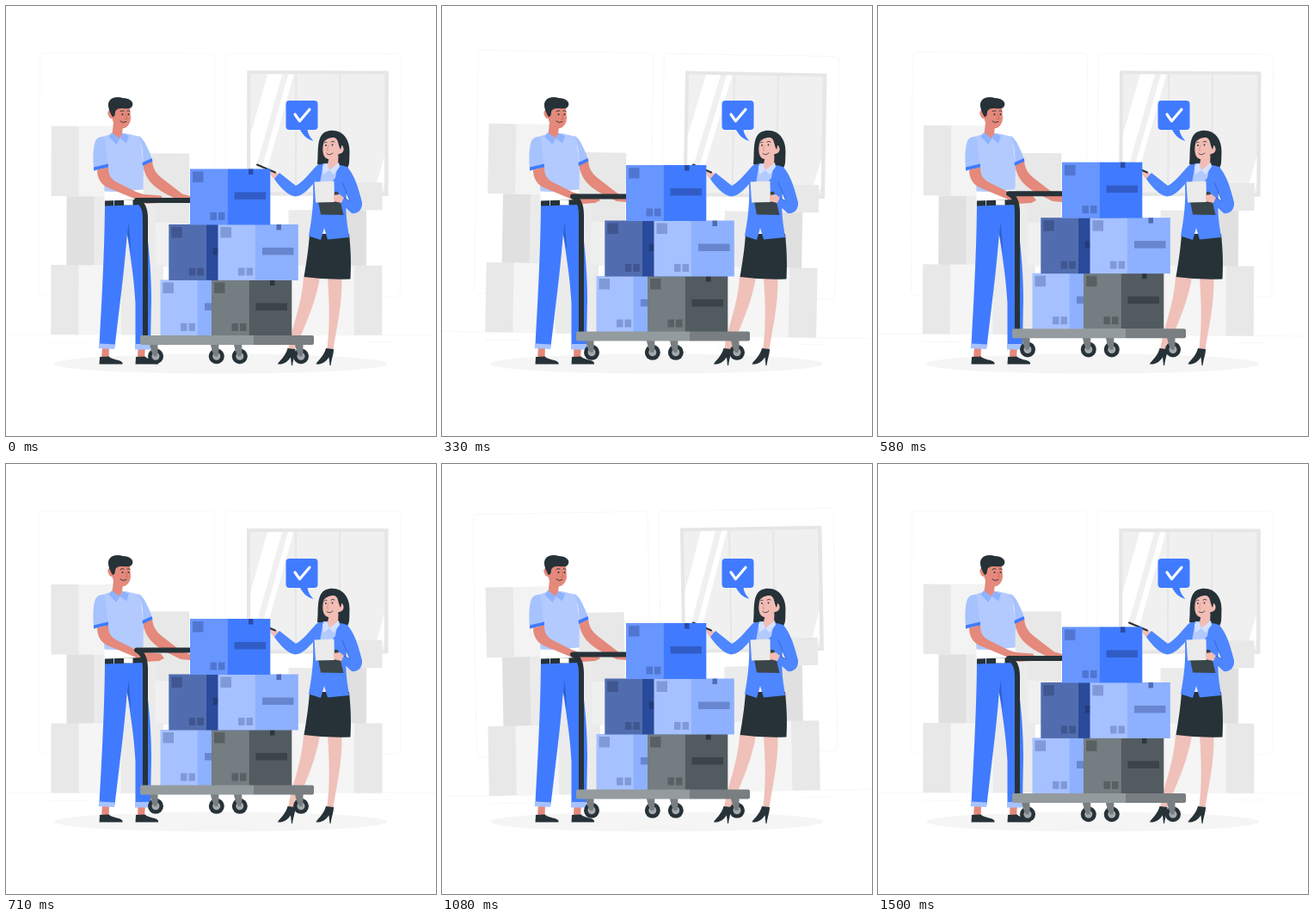
These frames come from a looping animation (500 by 500 pixels, 1.54 s). An HTML page:

```html
<!DOCTYPE html>
<html lang="en">
<head>
<meta charset="utf-8">
<title>Delivery check</title>
<style>
  html, body { margin: 0; width: 100%; height: 100%; overflow: hidden; background: #fff; }
  svg { display: block; width: 100vw; height: 100vh; }
</style>
</head>
<body>
<svg viewBox="0 0 500 500">
  <g id="room">
    <g fill="none" stroke="#f6f6f6" stroke-width=".8">
      <rect x="39" y="55" width="203.500" height="282.500" rx="5"/>
      <rect x="255" y="55" width="203.500" height="282.500" rx="5"/>
      <path d="M0 382.500H500M416 390.500H449M322 397.500H331M52 391.500H95"/>
    </g>
    <path fill="#e6e6e6" d="M280 75H444.500V220.500H280z"/>
    <path fill="#f0f0f0" d="M284 79H440V216.500H284z"/>
    <path fill="#fff" d="M304 79H321L284 211V150zM328 79H334.500L296 216.500H289.500zM440 174V206L437 216.500H428z"/>
    <path stroke="#e6e6e6" stroke-width="2" d="M337 79V216M388 79V216"/>
    <g id="stock"></g>
  </g>

  <ellipse cx="249.500" cy="416" rx="193.500" ry="11.500" fill="#f5f5f5"/>

  <g id="man">
    <g fill="#e4897b">
      <path d="M112 396H120L119.500 410H111zM153.500 396H162L161 410H153z"/>
      <path d="M159 184L170 180C171 190 175 195 181 200L205 218.500L214 221V228L203 227L187 219C171 210 162 202 159 184z"/>
    </g>
    <path fill="#263238" d="M109 408L119.500 407.500C124 412 134 411 135.500 415V416.500H108.500zM151 408L161.500 407.500C166 412 176 411 177 415V416.500H150.500z"/>
    <path fill="#407bff" d="M115 231L159.500 230C164 262 169 300 169 340L168 396H150.500L150.500 345C148.500 310 144 290 141 264C138 300 135 325 132 350L126.500 396L108.500 395C111 350 114.500 290 115 231z"/>
    <path fill="#2f5fcf" d="M142.500 251L145.500 286L141 266z"/>
    <path fill="#a6c2ff" d="M108.500 392.500L127 393.500L126 399L107.500 398zM150 393H168.500L168 399.500H150z"/>
    <path fill="#fff" d="M114.500 214H159.500V227H114.500z"/>
    <path fill="#b3caff" d="M122 149L110 152.500L113 187L114.500 215.500Q136 217 159.500 213L160 184L156 152L139 148z"/>
    <path fill="#a6c2ff" d="M114 152C109 152 106 153 104 157C101 165 101 177 102 190L118.500 186C116.500 174 117 163 114 152zM154 151C158 153 161 157 163 162C166 168 169 174 170 180L159.500 184C160 172 158 161 154 151z"/>
    <path fill="#407bff" d="M102 187.500L119 183.500V187.500L102 191.500zM158.500 182L169.500 177L170.500 180.500L159 186z"/>
    <path fill="#e4897b" d="M106 190.500L119 187.500C119 197 122 201 129 205L151 216L160 219L180 220.500L184 226L178 229L163 230L148 223.500L118 211C110 207 106 200 106 190.500z"/>
    <path fill="#263238" d="M115 226.500L159.500 225V231L115 232.500z"/>
    <path fill="#fff" d="M137 225.500H147.500V231.500H137z"/>
    <path stroke="#b3caff" d="M125.500 226V232"/>
    <path fill="#e4897b" d="M125 135L136 139L135 149L132 154L123.500 149z"/>
    <path fill="#8fb2ff" d="M123 147L132.500 154L128.500 161L119.500 152zM135.500 148L132.500 154L140 159.500L143 151z"/>
    <path fill="#e4897b" d="M122 121C119 120 117.500 124 119 127C120 130 122 131 123.500 131C125 137 128 141.500 133 142.500C140 143 144.500 138 145 131L144 116L125 114z"/>
    <path fill="#263238" d="M124 129C120 123 117 114 120.500 110C123 106 130 105 136 107C143 107 149 111 147 116C145 120 141 119.500 136 119C131 118.500 128 120 127 123C127 126 126 129 124 129z"/>
    <g fill="none" stroke="#263238" stroke-width=".9" stroke-linecap="round">
      <path d="M133 122.500Q135 121 137 122M141 122Q142.500 121 144 122.500M133 134Q136 137 140 134.500"/>
      <path stroke="#c96f63" d="M139.500 126L141 131.500H138.500"/>
    </g>
    <g fill="#263238"><circle cx="135.500" cy="126" r="1"/><circle cx="142.500" cy="126" r="1"/></g>
  </g>

  <g id="woman">
    <path fill="#efc1b9" d="M346 315H365C361 342 349 369 335 402L328 400C333 370 344 348 346 315zM374 316H390.500C391 347 385 371 380 402H373C377 371 376 346 374 316z"/>
    <path id="boot" fill="#263238" d="M327.500 398L336.500 399C336.500 405 334 410 333 418H332L331 408.500C327 414 323 417 316 416.500C317 413 325 408 327.500 398z"/>
    <use href="#boot" x="44.500"/>
    <path fill="#263238" d="M353 265H399C401 285 401.500 300 400.500 317.500Q372 318.500 346.500 315C350 295 352 280 353 265z"/>
    <path fill="#263238" d="M362 184C364 172 359 147 376 145C392 143 400 156 399.500 170C399 178 400 184 397 188L380 190z"/>
    <path fill="#f2bdb5" d="M307.500 191L314 193L319 197L314 203C309 199 306 195 307.500 191z"/>
    <path stroke="#263238" stroke-width="2" stroke-linecap="round" d="M292 184.500L313 193.500"/>
    <path fill="#4d86ff" d="M366 184C374 182 388 184 398 187.500C397 205 395 224 395.500 240C396 252 398 260 399 269L374 271.500L370 258L366 272L352 267.500C356 246 358 227 357 207C350 215 344 221 336 221.500C327 220 318 210 312 201L318 194L337 209C347 204 356 190 362 185z"/>
    <path fill="#b3caff" d="M369 183L386 184L383 200L377 206H365z"/>
    <path fill="#f2bdb5" d="M376 174H386.500L386 185L376 191L374 184z"/>
    <path fill="#d5e2ff" d="M373 183L376 191L369 196L368 186zM387 182L376 191L381 196L388 187z"/>
    <path fill="#f2bdb5" d="M371 154C368 161 367 171 371 176C375 180 383 179 387 172C391 172 394 168 392 164C391 161 388 163 388 163L385 152z"/>
    <path fill="#263238" d="M369 158C372 149 381 148 386 151C390 154 391 162 389 167C386 162 387 155 382 153C377 152 373 155 369 158z"/>
    <g fill="none" stroke="#263238" stroke-width=".8" stroke-linecap="round">
      <path d="M370 159Q371.500 157.500 373 158.500M378 158Q380 156.500 382 158M373 171.500Q376 174.500 380 171"/>
      <path stroke="#d99488" d="M375 162L373 168H375.500"/>
    </g>
    <g fill="#263238"><circle cx="372" cy="162" r=".9"/><circle cx="379.500" cy="161.500" r=".9"/></g>
    <path fill="#3a4549" d="M361 216H386L392.500 243L366 242.500z"/>
    <path fill="#ebebeb" d="M358.500 204.500L381.500 203.500L382 228L360 228.500z"/>
    <path fill="#f2bdb5" d="M381 220L388 219L393 223L390 229L381 227z"/>
    <path fill="#4d86ff" d="M396 187C404 193 410 212 414 228C415 238 408 242 402 241L390 230L393 223L400 227L391 205z"/>
    <path fill="none" stroke="#2f5fcf" stroke-width=".8" d="M391 205L400 227L393 223"/>
  </g>

  <g id="bubble">
    <rect x="325.500" y="110" width="37" height="34" rx="4" fill="#407bff"/>
    <path fill="#407bff" d="M341.500 143C345 150 350 155 357.500 157C354 153 351 149 350.500 143z"/>
    <path fill="none" stroke="#fff" stroke-width="3.200" stroke-linecap="round" stroke-linejoin="round" d="M336 126L341.500 133.800L353 120.200"/>
  </g>

  <g id="cart">
    <path fill="none" stroke="#263238" stroke-width="6" stroke-linecap="round" stroke-linejoin="round" d="M214 226.500H152C158 229 162 236 162 248V385"/>
    <g id="wheels"></g>
    <g id="load"></g>
    <path fill="#949b9e" d="M158 383.500H288V394.500H158Q156 394.500 156 392.500V385.500Q156 383.500 158 383.500z"/>
    <path fill="#787e81" d="M288 383.500H356Q358 383.500 358 385.500V392.500Q358 394.500 356 394.500H288z"/>
  </g>
</svg>

<script>
const $ = id => document.getElementById(id);
const rect = (x, y, w, h, fill, op = 1) =>
  `<rect x="${x}" y="${y}" width="${w}" height="${h}" fill="${fill}" fill-opacity="${op}"/>`;

// Pale stacks at the back of the room
$("stock").innerHTML = [
  [134, 171.5, 79, 81, "#e8e8e8"], [134, 252, 81, 51, "#f0f0f0"],
  [84, 140, 50, 81.5, "#f3f3f3"], [52.5, 140, 32, 81.5, "#e8e8e8"],
  [102, 221.5, 72, 81.5, "#ebebeb"], [70.5, 221.5, 32, 81.5, "#e0e0e0"],
  [84, 301.5, 50, 81, "#f5f5f5"], [134, 301.5, 49, 81, "#ebebeb"],
  [52.5, 301.5, 32, 81, "#e8e8e8"],
  [357, 205, 48, 32, "#f0f0f0"], [405, 205, 32.5, 32, "#e8e8e8"],
  [328.5, 237, 59, 65, "#ebebeb"], [387, 237, 32, 65, "#e0e0e0"],
  [320, 301.5, 85, 81, "#f5f5f5"], [405, 301.5, 32.5, 81, "#e8e8e8"]
].map(r => rect(...r)).join("");

// One carton: front face, side face and printed marks
function carton(x, y, front, side, ink) {
  const mark = (dx, dy, w, h, op) => rect(x + dx, y + dy, w, h, ink, op);
  return rect(x, y, 43.5, 65, front) + rect(x + 43.3, y, 50, 65, side) +
    mark(3, 3, 12.5, 12.5, .3) +
    mark(23.5, 50.5, 7.5, 9, .3) + mark(33, 50.5, 7.5, 9, .3) +
    mark(68, 0, 5.5, 6.5, .6) + mark(51.5, 27, 36.5, 8.5, .38);
}
$("load").innerHTML =
  carton(179.5, 319, "#a6c1ff", "#8db0ff", "#2a3f80") +
  carton(239, 319, "#747d81", "#525b60", "#171f24") +
  carton(189.3, 254.5, "#516db0", "#2a4a9b", "#142248") +
  carton(246.5, 254.5, "#a6c1ff", "#8db0ff", "#2a3f80") +
  carton(214, 190, "#6896ff", "#407bff", "#182c6c");

$("wheels").innerHTML = [174, 244.8, 271.8, 343].map(x =>
  `<circle cx="${x}" cy="407.800" r="9" fill="#263238"/>
   <circle cx="${x}" cy="407.800" r="4.500" fill="#a3a9ac"/>
   <path fill="#787e81" d="M${x - 8} 390H${x + 2.5}V402L${x + 1.5} 408H${x - 2}L${x - 5} 402z"/>`
).join("");

const LOOP = 1540, FPS = 24, CYCLE = 36;

function draw(t) {
  const step = Math.min(CYCLE, Math.floor((t + 4) * FPS / 1000));
  const p = (step + 1) / CYCLE % 1;
  const lift = 10 * (1 - Math.abs(2 * p - 1));
  const sway = p < .25 ? 4 * p : p < .75 ? 2 - 4 * p : 4 * p - 4;
  $("cart").setAttribute("transform", `translate(0 ${-lift})`);
  $("room").setAttribute("transform", `rotate(${sway} 250 250)`);
}

const start = performance.now();
function tick() {
  draw((performance.now() - start) % LOOP);
  requestAnimationFrame(tick);
}
tick();
</script>
</body>
</html>
```
